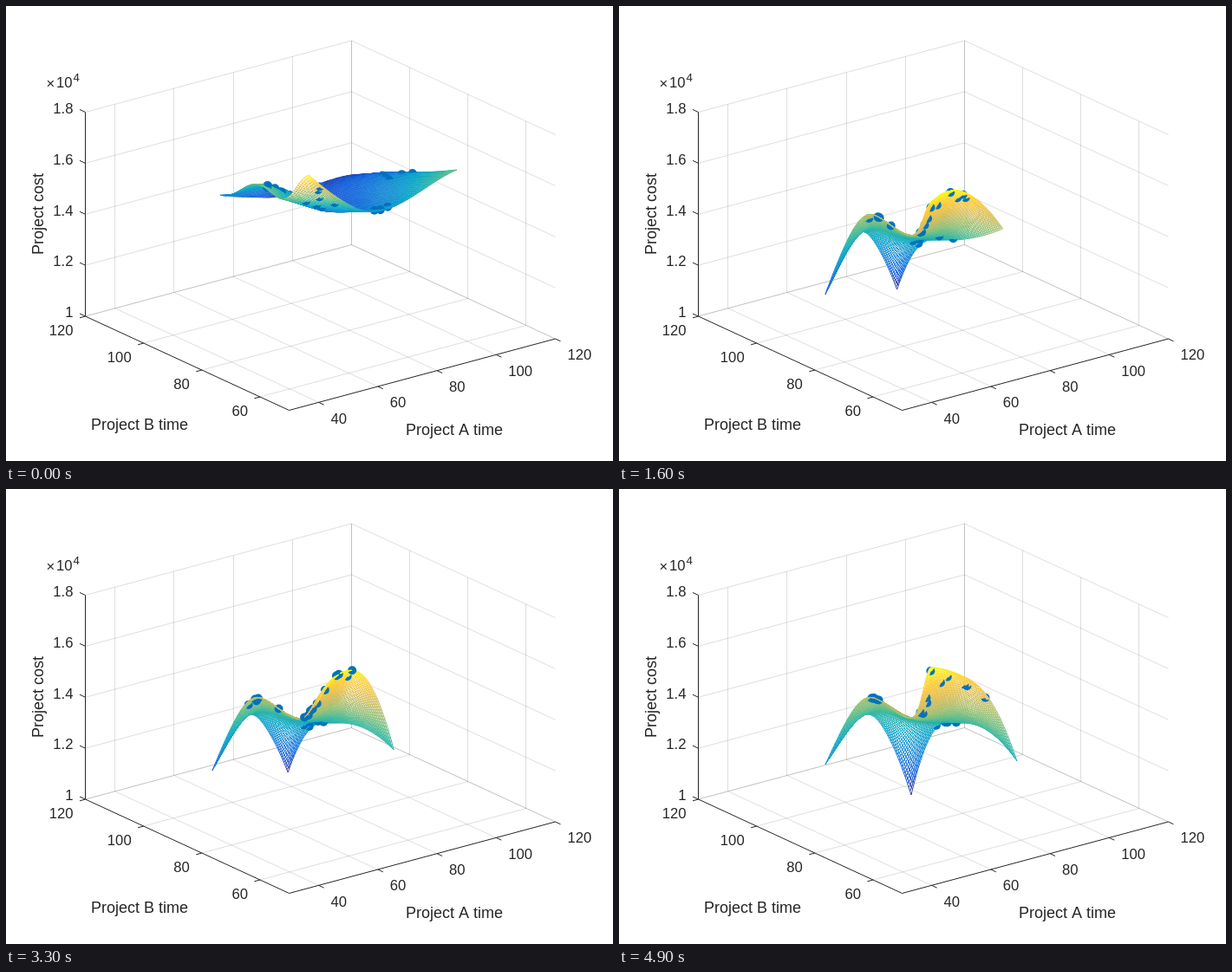
Write an HTML page with a canvas that moves like this. It is 700 by 525 pixels and loops after 5000 ms.

```html
<!DOCTYPE html>
<html lang="en">
<head>
<meta charset="utf-8">
<title>Project cost surface</title>
<style>
  html, body { margin: 0; width: 100%; height: 100%; overflow: hidden; background: #fff; }
  canvas { display: block; }
</style>
</head>
<body>
<canvas id="plot" width="700" height="525"></canvas>
<script>
const ctx = document.getElementById('plot').getContext('2d');
const LOOP = 5000, STEP = 100, N = 70;
const INK = '#262626', DOT = '#0072bd';
const FONT = '"Liberation Sans", Arial, sans-serif';
// Screen rise per pixel moved along the A and B axes
const RISE_A = 0.267, RISE_B = 0.46;

const parula = ['#352a87', '#0f5cdd', '#1283d5', '#06a5c9', '#33b8a1',
                '#87bf77', '#d1bb59', '#fec832', '#f9fb0e'].map(rgb);

// Screen heights of three corners, and lift of the near corner
const keys = [
  { at: 0,    left: 218, right: 189, far: 195, near: 46 },
  { at: 800,  left: 328, right: 261, far: 352, near: 54 },
  { at: 1600, left: 333, right: 257, far: 327, near: 42 },
  { at: 2300, left: 330, right: 269, far: 326, near: 34 },
  { at: 3300, left: 325, right: 301, far: 327, near: 24 },
  { at: 4000, left: 338, right: 239, far: 315, near: 65 },
  { at: 4900, left: 318, right: 314, far: 353, near: 64 }
];

// Where the samples gather on the surface
const clusters = [
  { a: 0.10, b: 0.62, da: 0.20, db: 0.26 },
  { a: 0.12, b: 0.18, da: 0.24, db: 0.20 },
  { a: 0.92, b: 0.62, da: 0.14, db: 0.40 },
  { a: 0.35, b: 0.05, da: 0.70, db: 0.10 }
];

function rgb(hex) {
  return [1, 3, 5].map(i => parseInt(hex.slice(i, i + 2), 16));
}

const lerp = (a, b, f) => a + (b - a) * f;
const clamp = v => Math.max(0, Math.min(1, v));
const bell = v => Math.exp(-v * v);

function smooth(from, to, v) {
  const f = clamp((v - from) / (to - from));
  return f * f * (3 - 2 * f);
}

function random(n) {
  const v = Math.sin(n * 12.9898) * 43758.5453;
  return v - Math.floor(v);
}

function shade(v) {
  const p = Math.min(clamp(v), 0.9999) * (parula.length - 1), i = Math.floor(p);
  return `rgb(${parula[i].map((c, n) => Math.round(lerp(c, parula[i + 1][n], p - i)))})`;
}

function poseAt(t) {
  let k = 0;
  while (k < keys.length - 2 && t >= keys[k + 1].at) k++;
  const from = keys[k], to = keys[k + 1];
  let f = clamp((t - from.at) / (to.at - from.at));
  if (k === 0) f = 1 - (1 - f) ** 3;
  const pose = { spread: k === 0 ? 1 - f : 0 };
  for (const name of ['left', 'right', 'far', 'near']) pose[name] = lerp(from[name], to[name], f);
  pose.nearX = 360 - 10 * pose.spread;
  pose.leftX = 238 + 9 * (1 - smooth(600, 1500, t));
  pose.rightX = 442 + 18 * (t / LOOP) ** 3 + 78 * pose.spread;
  return pose;
}

// Screen height over the unit square, near corner at (0, 0)
function surface({ spread, near, left, right, far }) {
  const crest = lerp(136 - 1.17 * near, -30, spread);
  const body = (a, b) => {
    const ridge = (30 + 6 * spread) * bell(a / 0.6) * bell((b - 0.6 - 0.6 * a) / 0.29);
    const lift = near * (1 - a) ** 2 + 2 * crest * a * (1 - a);
    const hump = lift * bell(b / (0.1 + 0.33 * a + 0.12 * spread));
    return 270 - 28 * spread - 50 * spread * smooth(0.3, 1, a) - ridge - hump;
  };
  const pull = (da, db, r) => Math.max(0, 1 - Math.hypot(da, db) / r) ** 2;
  const dropL = left - body(0, 1), dropR = right - body(1, 0), dropK = far - body(1, 1);
  return (a, b) => body(a, b)
    + dropL * pull(0.7 * a, 1 - b, 0.45)
    + dropR * pull(1 - a, b, 0.5)
    + dropK * pull(1 - a, 1.7 * (1 - b), 0.55);
}

function meshAt(t) {
  const pose = poseAt(t), height = surface(pose);
  const spanA = pose.rightX - pose.nearX, spanB = pose.nearX - pose.leftX;
  const mesh = [];
  for (let i = 0; i < N; i++) {
    mesh.push([]);
    for (let j = 0; j < N; j++) {
      const a = i / (N - 1), b = j / (N - 1), u = spanA * a, v = spanB * b, y = height(a, b);
      mesh[i].push({ x: pose.nearX + u - v, y, z: -y - RISE_A * u - RISE_B * v });
    }
  }
  return mesh;
}

// Each sample keeps its cell for half a loop, then moves on
function sampleCells(t) {
  const cells = new Set();
  for (let n = 0; n < 20; n++) {
    const seed = n * 7 + 3 + 200 * Math.floor(t / LOOP * 2 + random(n + 50));
    const c = clusters[n % clusters.length];
    const a = clamp(c.a + c.da * (random(seed) - 0.5));
    const b = clamp(c.b + c.db * (random(seed + 1) - 0.5));
    cells.add(Math.round(a * (N - 2)) * N + Math.round(b * (N - 2)));
  }
  return cells;
}

function drawSurface(mesh, cells) {
  const zs = mesh.flat().map(p => p.z);
  const low = Math.min(...zs), range = Math.max(...zs) - low;
  ctx.lineWidth = 0.95;
  ctx.lineJoin = 'round';
  for (let i = N - 2; i >= 0; i--) {
    for (let j = N - 2; j >= 0; j--) {
      const quad = [mesh[i][j], mesh[i + 1][j], mesh[i + 1][j + 1], mesh[i][j + 1]];
      ctx.beginPath();
      quad.forEach(p => ctx.lineTo(p.x, p.y));
      ctx.closePath();
      ctx.fillStyle = '#fff';
      ctx.fill();
      ctx.strokeStyle = shade((quad.reduce((s, p) => s + p.z, 0) / 4 - low) / range);
      ctx.stroke();
      if (cells.has(i * N + j)) {
        ctx.fillStyle = DOT;
        ctx.beginPath();
        ctx.arc(quad[0].x, quad[0].y, 5, 0, 2 * Math.PI);
        ctx.fill();
      }
    }
  }
}

function line(x1, y1, x2, y2) {
  ctx.beginPath();
  ctx.moveTo(x1, y1);
  ctx.lineTo(x2, y2);
  ctx.stroke();
}

function label(text, x, y, align, size = 16.67) {
  ctx.font = `${size}px ${FONT}`;
  ctx.textAlign = align;
  ctx.fillText(text, x, y + size * 0.35);
}

// a and b run 0..1 from the near corner, z 0..1 upwards
const project = (a, b, z = 0) =>
  [326.5 + 307 * a - 235 * b, 466.5 - 82.5 * a - 108.5 * b - 235.5 * z];

function segment(p, q) {
  const [x1, y1] = project(...p), [x2, y2] = project(...q);
  const snap = x => x1 === x2 ? Math.floor(x) + 0.5 : x;
  line(snap(x1), y1, snap(x2), y2);
}

function drawAxes() {
  ctx.fillStyle = '#fff';
  ctx.fillRect(0, 0, 700, 525);
  ctx.lineWidth = 1;
  ctx.strokeStyle = 'rgba(38,38,38,0.15)';
  for (let v = 40; v <= 120; v += 20) {
    const a = (v - 30) / 90;
    segment([a, 0], [a, 1]);
    segment([a, 1], [a, 1, 1]);
  }
  for (let v = 60; v <= 120; v += 20) {
    const b = (v - 50) / 70;
    segment([0, b], [1, b]);
    segment([1, b], [1, b, 1]);
  }
  for (let z = 0; z <= 1; z += 0.25) {
    segment([0, 1, z], [1, 1, z]);
    segment([1, 1, z], [1, 0, z]);
  }

  ctx.strokeStyle = ctx.fillStyle = INK;
  segment([0, 0], [1, 0]);
  segment([0, 0], [0, 1]);
  segment([0, 1], [0, 1, 1]);
  for (let v = 40; v <= 120; v += 20) {
    const [x, y] = project((v - 30) / 90, 0);
    line(x, y, x + 6, y + 2.8);
    label(v, x + 14, y + 18.5, 'left');
  }
  for (let v = 60; v <= 120; v += 20) {
    const [x, y] = project(0, (v - 50) / 70);
    line(x, y, x - 6.5, y + 1.8);
    label(v, x - 14, y + 16.5, 'right');
  }
  for (let i = 0; i <= 4; i++) {
    const [x, y] = project(0, 1, i / 4);
    line(x, y, x - 6.5, y - 3);
    label(+(1 + i / 5).toFixed(1), x - 14, y - 4.5, 'right');
  }
  label('×', 46.5, 89, 'left');
  label('10', 58, 88, 'left');
  label('4', 77.5, 82, 'left', 13.3);
  label('Project A time', 517, 489, 'center', 18);
  label('Project B time', 154, 483, 'center', 18);
  ctx.save();
  ctx.translate(37, 240);
  ctx.rotate(-Math.PI / 2);
  label('Project cost', 0, 0, 'center', 18);
  ctx.restore();
}

let shown = -1;
function frame(now) {
  const t = Math.floor(now % LOOP / STEP) * STEP;
  if (t !== shown) {
    shown = t;
    drawAxes();
    drawSurface(meshAt(t), sampleCells(t));
  }
  requestAnimationFrame(frame);
}
frame(0);
</script>
</body>
</html>
```
